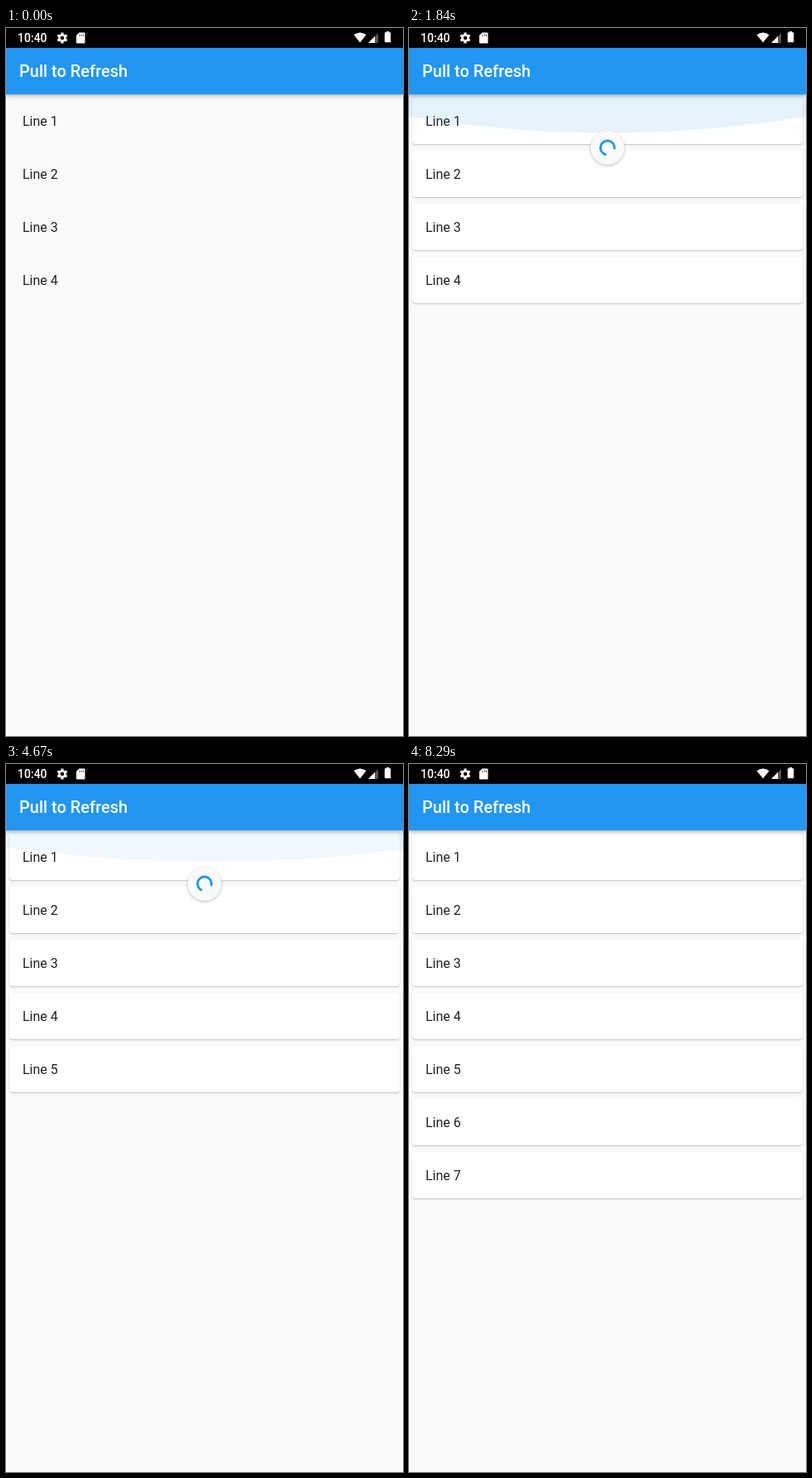
Write an HTML page that moves like this. It is 480 px wide and 854 px high and loops after 8.5 s.

```html
<!DOCTYPE html>
<html lang="en">
<head>
<meta charset="utf-8">
<title>Pull to Refresh</title>
<style>
  html, body { margin: 0; width: 100%; height: 100%; overflow: hidden; }
  body { position: relative; background: #fafafa; font-family: Roboto, sans-serif; color: #212121; }
  .status { position: absolute; inset: 0 0 auto; height: 24px; background: #000; z-index: 3; }
  .status svg { position: absolute; left: 0; top: 0; }
  .clock { position: absolute; left: 14px; top: 0; font: 500 14px/24px Roboto, sans-serif; color: #fff; }
  .bar { position: absolute; top: 24px; left: 0; width: 100%; height: 56px; z-index: 2;
    background: #2196f3; color: #fff; font: 500 20px/57px Roboto, sans-serif; text-indent: 16px;
    box-shadow: 0 1px 3px rgba(0,0,0,.2), 0 3px 5px rgba(0,0,0,.14); }
  .card { position: absolute; left: 4px; right: 4px; height: 56px; font-size: 16px; line-height: 57px; text-indent: 16px; }
  .card::before { content: ""; position: absolute; inset: 0; z-index: -1; border-radius: 4px;
    background: #fff; opacity: var(--edge, 1);
    box-shadow: 0 1px 1px rgba(0,0,0,.14), 0 1px 3px rgba(0,0,0,.1); }
  main { position: absolute; inset: 0; z-index: 0; }
  .fx { position: absolute; left: 0; top: 0; z-index: 1; }
  .disc { filter: drop-shadow(0 1.5px 1.5px rgba(0,0,0,.28)); }
</style>
</head>
<body>
<div class="status">
  <span class="clock">10:40</span>
  <svg width="480" height="24" fill="#fff">
    <g transform="translate(68 12)">
      <circle r="3.5" fill="none" stroke="#fff" stroke-width="2.6"/>
      <g id="teeth"></g>
    </g>
    <path d="M88.5 5.5h6a1 1 0 0 1 1 1v11a1 1 0 0 1-1 1h-8.5a1 1 0 0 1-1-1v-8.5z"/>
    <path d="M89 7.5v2.5M91.3 7.5v2.5M93.5 7.5v2.5" stroke="#555"/>
    <path d="M428 17.5L420.5 8.2Q428 3 435.5 8.2z"/>
    <path d="M450 6v12h-12z" fill="#555"/>
    <path d="M446 10v8h-8z"/>
    <path d="M460 4h3v1.3h1.5a.7.7 0 0 1 .7.7v10.5a.7.7 0 0 1-.7.7h-6a.7.7 0 0 1-.7-.7v-10.5a.7.7 0 0 1 .7-.7h1.5z"/>
  </svg>
</div>
<div class="bar">Pull to Refresh</div>
<main id="list"></main>
<svg class="fx" width="480" height="854">
  <defs><clipPath id="strip"><rect width="480" height="96.5"/></clipPath></defs>
  <g id="glow"><g clip-path="url(#strip)"><circle id="bulge" r="720" cy="-623.5" fill="#2196f3"/></g></g>
  <g id="indicator">
    <circle class="disc" r="20.5" fill="#fafafa"/>
    <g id="icon">
      <path id="arc" fill="none" stroke="#2196f3" stroke-width="2.8"/>
      <path id="head" fill="#2196f3"/>
    </g>
  </g>
</svg>
<script>
const LOOP = 8500, SNAP = 150, WAIT = 1045, SHRINK = 200;
const STROKE = 2.8, RADIUS = 8.5, TURN = 2 * Math.PI;

// One pull each: finger down, release, glow strength, glow size, glow centre
const pulls = [
  { down: 1100, up: 1680, alpha: .2, size: .9, cx: 240 },
  { down: 4030, up: 4480, alpha: .12, size: .85, cx: 250 },
  { down: 6240, up: 6668, alpha: .09, size: .835, cx: 281 }
];

const $ = id => document.getElementById(id);
const glow = $('glow'), bulge = $('bulge'), indicator = $('indicator');
const icon = $('icon'), arc = $('arc'), head = $('head'), list = $('list');

const clamp = x => Math.max(0, Math.min(1, x));
const span = (x, a, b) => clamp((x - a) / (b - a));
const decelerate = x => 1 - (1 - x) ** 2;
const smooth = x => x * x * (3 - 2 * x);

// cubic-bezier(.4, 0, .2, 1)
function fastOutSlowIn(x) {
  let lo = 0, hi = 1;
  for (let i = 0; i < 20; i++) {
    const s = (lo + hi) / 2, r = 1 - s;
    if (1.2 * s * r * r + .6 * s * s * r + s ** 3 < x) lo = s; else hi = s;
  }
  return smooth(lo);
}

$('teeth').innerHTML = [...Array(6)].map((_, i) =>
  `<rect x="-1.5" y="-6.5" width="3" height="3" transform="rotate(${i * 60})"/>`).join('');

const cards = [...Array(7)].map((_, i) => {
  const card = document.createElement('div');
  card.className = 'card';
  card.style.top = 84 + i * 64 + 'px';
  card.textContent = 'Line ' + (i + 1);
  list.append(card);
  return card;
});

const polar = (a, r) => [r * Math.cos(a), r * Math.sin(a)];

// ms: time on the spinner clock, value: pull progress for the extra turn, tip: arrow size
function drawIcon(ms, value, tip) {
  const step = ms % 1333 / 1333;
  const lead = fastOutSlowIn(span(step, 0, .5)), tail = fastOutSlowIn(span(step, .5, 1));
  const extra = value < .33 ? -.1 - value / 3.3 : -.2 + 1.55 * (value - .33) / .67;
  const a = TURN * (-.25 + .75 * tail + ms / 2222 + step / 4 + extra / 2);
  const sweep = Math.max(.75 * TURN * (lead - tail), .001), b = a + sweep;
  arc.setAttribute('d',
    `M${polar(a, RADIUS)}A${RADIUS} ${RADIUS} 0 ${+(sweep > Math.PI)} 1 ${polar(b, RADIUS)}`);
  const [x, y] = polar(b, RADIUS), [tx, ty] = polar(b + TURN / 4, STROKE * 2 * tip);
  const half = STROKE * 1.5 * tip;
  head.setAttribute('d', tip
    ? `M${polar(b, RADIUS - half)}L${polar(b, RADIUS + half)}L${[x + tx, y + ty]}z` : '');
}

function drawPull(t, p) {
  const spin = p.up + SNAP, done = spin + WAIT;
  const drag = smooth(span(t, p.down, p.down + 170));
  const pos = drag - span(t, p.up, spin) / 3;
  const scale = 1 - span(t, done, done + SHRINK);
  indicator.setAttribute('transform', `translate(240 ${55.5 + 133.5 * pos}) scale(${scale})`);
  indicator.style.display = scale > 0 ? '' : 'none';
  icon.setAttribute('opacity', clamp(pos * 1.5));
  if (t < spin) {
    const value = .75 * pos, grown = span(value, .1, .33);
    drawIcon(666 * grown, value, grown);
  } else {
    drawIcon(666.5 + t - spin, .5, 0);
  }

  const level = decelerate(span(t, p.down + 190, p.down + 310)) * (1 - decelerate(span(t, p.up, p.up + 600)));
  glow.setAttribute('transform', `translate(0 80) scale(1 ${p.size * level})`);
  glow.setAttribute('opacity', p.alpha * level);
  bulge.setAttribute('cx', p.cx);
}

function frame(now) {
  const t = now % LOOP;
  const active = pulls.filter(p => t >= p.down).pop();
  const added = pulls.filter(p => t >= p.up + SNAP + WAIT).length;
  cards.forEach((card, i) => { card.hidden = i >= 4 + added; });
  list.style.setProperty('--edge', span(t, 20, 300));
  if (active) drawPull(t, active);
  else {
    indicator.style.display = 'none';
    glow.setAttribute('opacity', 0);
  }
  requestAnimationFrame(frame);
}
frame(0);
</script>
</body>
</html>
```
